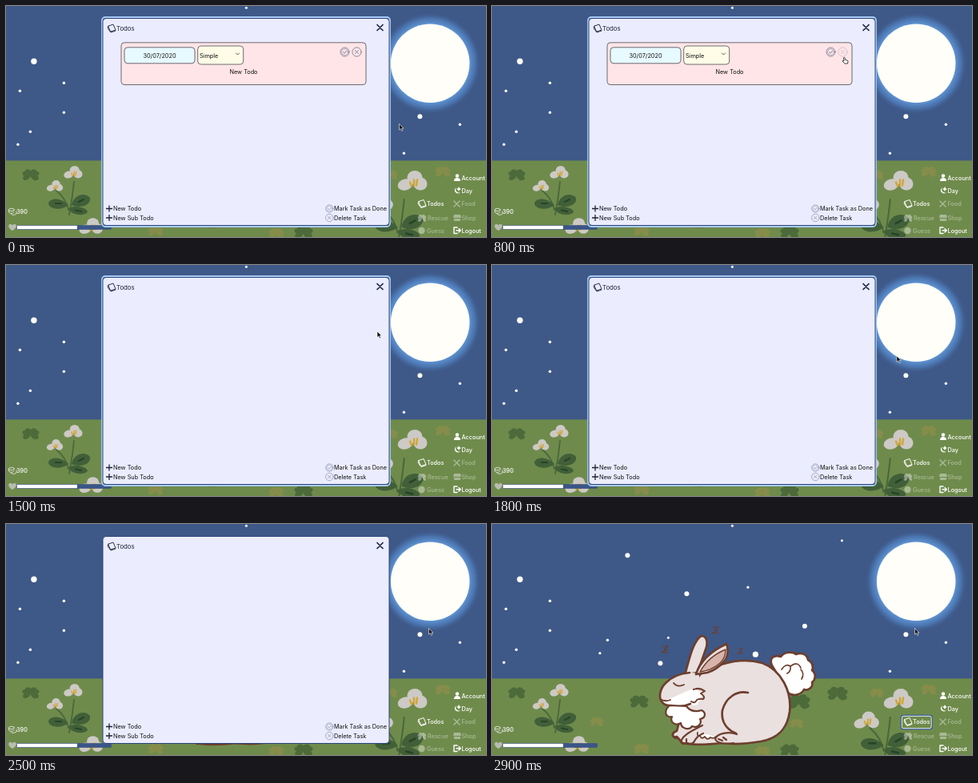
These frames come from a looping animation (600x289 px, 3 s). An HTML page:

```html
<!DOCTYPE html>
<html lang="en">
<head>
<meta charset="utf-8">
<title>Todos</title>
<style>
  html, body { margin: 0; width: 100%; height: 100%; overflow: hidden; background: #3e5888; }
  svg { display: block; width: 600px; height: 289px; font: 7.3px Inter, sans-serif; }
  .line { fill: none; stroke-linecap: round; stroke-linejoin: round; }
  .fur { stroke: #6d3e2e; stroke-width: 2.7; stroke-linecap: round; stroke-linejoin: round; }
</style>
</head>
<body>
<svg viewBox="0 0 600 289">
  <defs>
    <radialGradient id="glow">
      <stop offset=".77" stop-color="#5f93d2"/>
      <stop offset=".88" stop-color="#4f7fbd" stop-opacity=".7"/>
      <stop offset="1" stop-color="#3e5888" stop-opacity="0"/>
    </radialGradient>
    <path id="heart" d="M0 0C-8-3-9-9-5-10Q-2-11 0-8Q2-11 5-10C9-9 8-3 0 0Z"/>
    <g id="clover">
      <use href="#heart"/>
      <use href="#heart" transform="rotate(-95)"/>
      <use href="#heart" transform="rotate(95)"/>
      <path class="line" d="M0 0Q1 5 5 8" stroke="currentColor" stroke-width="1.5"/>
    </g>
    <g id="flower">
      <g fill="#cdc9c6">
        <ellipse cx="-10" cy="4" rx="9.5" ry="7" transform="rotate(-15 -10 4)"/>
        <ellipse cx="9" cy="3" rx="8.5" ry="8"/>
        <ellipse cx="2" cy="-5" rx="9.5" ry="8.5"/>
      </g>
      <path class="line" d="M-4 1L-2 6M1-2V5M5-2L4 5" stroke="#d3a634" stroke-width="2.4"/>
    </g>
    <g id="plant">
      <path class="line" d="M-1 26Q3 5 5-15M-2 20Q-5 6-17-4" stroke="#4a683c" stroke-width="1.8"/>
      <g fill="#416039">
        <path d="M-2 14C-13 3-26 6-27 12C-26 20-10 21-2 14Z"/>
        <path d="M2 14C4 1 19-3 25 5C27 14 13 19 2 14Z"/>
        <path d="M-2 18C8 13 22 18 22 23C16 29 0 26-2 18Z"/>
      </g>
      <path class="line" d="M-18 12H-11M11 10L17 7M7 20.500L14 22" stroke="#274526" stroke-width="2.200"/>
    </g>
    <g id="book" class="line" stroke="currentColor">
      <path d="M-4-3L2-5L5 2L-1 4ZM-4-3Q-6-1-4 1L-1 5L5 3"/>
    </g>
    <g id="check" class="line" stroke="#66708a" stroke-width=".8">
      <circle r="5.5"/><circle r="4" stroke-width=".5"/><path d="M-2 0L-.5 1.7L2.5-1.8"/>
    </g>
    <g id="cross" class="line" stroke="#66708a" stroke-width=".8">
      <circle r="5.6"/><path d="M-2-2L2 2M2-2L-2 2"/>
    </g>
    <path id="plus" d="M-4 0H4M0-4V4" stroke="#1d2436" stroke-width="1.3"/>
    <path id="zed" class="line" d="M-3-4Q0-5 4-4Q1-2-1 0H3Q0 2-4 4Q0 3 4 4" stroke="#6d3e2e" stroke-width="1.2"/>
  </defs>

  <rect width="600" height="289" fill="#3e5888"/>
  <g id="stars" fill="#fffef6" transform="translate(.4 .2)"></g>
  <circle cx="530.2" cy="71.7" r="64" fill="url(#glow)"/>
  <circle cx="530.2" cy="71.7" r="49.3" fill="#fffef8"/>
  <rect y="193.4" width="600" height="96" fill="#6f8b4c"/>
  <g id="clovers"></g>
  <use href="#plant" x="80" y="235"/>
  <use href="#flower" transform="translate(84.5 208.500)scale(.63)"/>
  <use href="#flower" transform="translate(61.500 225.500)scale(.55)"/>
  <use href="#flower" transform="translate(107 276)scale(.8)"/>
  <use href="#plant" transform="translate(492 260)scale(1.15 1.2)"/>
  <use href="#flower" transform="translate(509 219.500)"/>
  <use href="#flower" transform="translate(469 246)scale(.85)"/>

  <g id="rabbit" class="fur" fill="#e9e0df">
    <path fill="#fff" d="M350 177C346 168 352 163 361 166C365 160 376 159 380 163C387 160 394 163 395 170C401 173 402 180 400 183C406 188 404 195 400 198C402 204 395 209 390 207C387 213 378 216 371 212Z"/>
    <path fill="none" stroke-width="1.7" d="M362 182Q367 174 373 178Q374 184 369 187M373 178Q382 171 386 180M386 182Q391 187 387 194"/>
    <path d="M241 189C246 172 250 150 260 141C267 137 271 147 267 157Q262 173 256 186Z"/>
    <path d="M260 188C284 174 310 166 338 174C362 183 375 210 372 235C369 256 358 268 336 272C319 275 302 276 288 274C270 276 252 277 238 274L231 266C224 268 224 261 231 259L240 225Z"/>
    <path d="M258 187C244 184 229 188 220 196C211 203 207 215 212 222Q216 228 224 227C242 231 262 224 266 213Z" stroke="none"/>
    <path fill="#fff" stroke="none" d="M211 221C224 221 242 207 252 207L264 211L257 226Q228 231 211 221Z"/>
    <path fill="none" d="M247 186C234 187 224 192 217 199C210 206 208 216 212 222Q216 228 224 227Q237 230 248 225"/>
    <path fill="#fff" stroke-width="2.200" d="M222 227C214 234 217 243 225 241C222 248 229 253 236 249C237 257 247 258 250 253C257 256 263 250 260 244C267 243 268 236 262 233C252 236 246 232 243 228Z"/>
    <path fill="none" stroke-width="2" d="M252 207Q259 204 266 209L261 212Q267 216 264 219Q259 218 256 220Q254 225 249 222"/>
    <path d="M255 188C260 172 274 159 293 150C296 157 295 167 289 173Q281 182 269 186Z"/>
    <path fill="#d8b3ab" stroke-width="1.400" d="M260 185C266 174 277 163 292 157Q292 168 285 174Q275 183 260 185Z"/>
    <path fill="none" stroke-width="1.900" d="M227 199Q232 205 240 201M210 219Q216 223 223 220"/>
    <path fill="none" d="M320 211C305 208 292 218 288 233C286 247 293 257 305 262"/>
    <path stroke-width="2.200" d="M306 263C296 259 281 262 279 269C281 275 293 275 302 274M283 269L288 271M289 267L293 270"/>
    <path fill="#fff" stroke-width="1.800" d="M257 261Q256 266 260 265Q262 270 266 266Q269 271 273 267Q277 269 280 266"/>
    <path fill="none" stroke-width="2.200" d="M263 252C255 256 245 260 239 267C234 273 237 277 244 274Q251 277 254 270Q257 265 264 262M243 269V274M231 259C224 261 225 269 232 268"/>
  </g>
  <use href="#zed" x="279" y="133"/>
  <use href="#zed" x="216" y="157"/>
  <use href="#zed" transform="translate(310 159)scale(.8)"/>

  <g fill="#fff">
    <g class="line" stroke="#dfe3d8" stroke-width=".9">
      <ellipse cx="7" cy="255" rx="3.5" ry="1.7"/><path d="M3.5 255V258Q7 261 10 258M6 260Q9 263 13 260V257"/>
    </g>
    <text x="13" y="260" font-weight="500">390</text>
    <use href="#heart" transform="translate(8 281)scale(.65 .8)" fill="#b9bdb1"/>
    <rect x="13.5" y="274.5" width="118" height="5" rx="1" fill="#3a5689"/>
    <rect x="13.5" y="274.5" width="75.5" height="5" rx="1"/>
    <rect x="13.5" y="274.5" width="118" height="5" rx="1" fill="none" stroke="#3a5176" stroke-width=".6"/>
  </g>

  <g id="focus" fill="none">
    <rect x="511.500" y="239.500" width="38.500" height="17" rx="2.500" stroke="#2f559a" stroke-width="1.600"/>
    <rect x="512.300" y="240.300" width="36.900" height="15.400" rx="2" stroke="#fff" stroke-width=".9"/>
  </g>
  <g id="menu" font-weight="500"></g>
  <g fill="#fff" color="#fff">
    <circle cx="564" cy="212.5" r="2.2"/><path d="M560 219Q560 215 564 215T568 219Z"/>
    <path d="M563 227A4 4 0 1 0 568 233A4 4 0 0 1 563 227Z"/><path d="M566 226l1 2 2 1-2 1-1 2-1-2-2-1 2-1Z"/>
    <use href="#book" x="520" y="247.5"/>
    <path class="line" d="M564 277H560V284.500H564M563 280.700H568M566 278.500L568.300 280.700L566 283" stroke="#fff" stroke-width="1.4"/>
  </g>
  <g fill="#fff" opacity=".4">
    <path class="line" d="M560 244L567 251M567 244L560 251" stroke="#fff" stroke-width="1.5"/>
    <use href="#clover" transform="translate(520 266)scale(.5)"/>
    <path d="M560 261H568L569 265H559ZM560 266H568V269H560Z"/>
    <circle cx="519.500" cy="281" r="4.200"/>
  </g>

  <g id="modal" fill="#111">
    <rect id="ring" x="120" y="14" width="360" height="262" rx="4" fill="none" stroke="#a9ccf5" stroke-width="1.8"/>
    <rect x="121" y="15.500" width="358" height="259" rx="4" fill="#ebecfe" stroke="#29447a"/>
    <g color="#30384c"><use href="#book" x="132" y="28"/></g>
    <text x="138" y="31" font-size="7.8" fill="#222a3c">Todos</text>
    <path class="line" d="M464 23.500L471 30.500M471 23.500L464 30.500" stroke="#1c2742" stroke-width="1.700"/>
    <use href="#plus" x="129" y="253.500"/>
    <use href="#plus" x="129" y="265"/>
    <text x="134" y="256">New Todo</text>
    <text x="134" y="267.600">New Sub Todo</text>
    <use href="#check" transform="translate(404.300 253.500)scale(.85)" opacity=".75"/>
    <use href="#cross" transform="translate(404.300 265)scale(.85)" opacity=".75"/>
    <text x="410" y="256">Mark Task as Done</text>
    <text x="410" y="267.600">Delete Task</text>
    <g id="card">
      <g stroke="#484951" stroke-width=".8">
        <rect x="144" y="45.800" width="306" height="52.700" rx="4" fill="#ffe5e7"/>
        <rect x="148" y="51.800" width="88" height="20" rx="4" fill="#e7faff"/>
        <rect x="239.700" y="50" width="57" height="23" rx="4" fill="#fffde8"/>
      </g>
      <text x="192" y="64.700" text-anchor="middle">30/07/2020</text>
      <text x="242" y="64.700">Simple</text>
      <path class="line" d="M287.500 59L289.500 61L291.500 59" stroke="#6b4a40"/>
      <text x="297" y="84.500" text-anchor="middle">New Todo</text>
      <use href="#check" x="423.500" y="57.500"/>
      <use id="remove" href="#cross" x="438.500" y="57.500"/>
    </g>
  </g>

  <g id="cursor" stroke-linejoin="round">
    <path id="arrow" d="M0 0V7.500L1.800 6L3.100 8.800L4.500 8.200L3.200 5.500H5.500Z" fill="#111" stroke="#fff" stroke-width=".6"/>
    <path id="hand" d="M-.5.800Q.300-.300 1 .800L1.700 3.500L4.500 4.200Q5.500 5 4.500 8H1L-2 5Q-2 4 0 4.700Z" fill="#fff" stroke="#111" stroke-width=".8"/>
  </g>
</svg>
<script>
const $ = id => document.getElementById(id);
const show = (id, on) => $(id).style.display = on ? '' : 'none';

const stars = [
  [300, 2, 1.5], [437, 20.5, 1.5], [169, 39, 3], [34.5, 69, 3.7], [243, 87, 3], [319.5, 79, 1.6], [17, 106, 1.7],
  [72, 96, 1.7], [72, 133, 1.7], [390.5, 127.5, 3], [144, 145, 1.7], [30, 157, 1.7], [134.5, 161.5, 1.6],
  [14.5, 173, 1.7], [220, 142, 1.5], [210, 174, 3], [329, 163, 3.6], [517, 138, 3], [567, 148, 1.7], [497, 184, 1.7]
];
$('stars').innerHTML = stars.map(([x, y, r]) => `<circle cx="${x}" cy="${y}" r="${r}"/>`).join('');

const dark = '#4c6a3a', olive = '#868d4a';
const clovers = [[31, 212, 1, dark], [184, 223, 1.1, dark], [432, 213, 1.2, dark], [384, 223, 1.3, dark], [372, 284, 1.1, dark],
  [131, 248, .8, olive], [187, 282, .9, olive], [381, 250, .8, olive], [338, 285, .9, olive], [481, 212, .8, olive], [546, 208, .9, olive]];
$('clovers').innerHTML = clovers.map(([x, y, s, color]) =>
  `<use href="#clover" transform="translate(${x} ${y})scale(${s} ${s * .75})" fill="${color}" color="${color}"/>`).join('');

const menu = [['Account', 569.5, 217.7, 1], ['Day', 569.5, 233.7, 1], ['Todos', 526, 250, 1], ['Food', 569.5, 250, .4],
  ['Rescue', 527, 267.7, .4], ['Shop', 569.5, 267.7, .4], ['Guess', 526, 283.5, .4], ['Logout', 569.5, 283.5, 1]];
$('menu').innerHTML = menu.map(([label, x, y, alpha]) =>
  `<text x="${x}" y="${y}" fill="#fff" opacity="${alpha}">${label}</text>`).join('');

// Cursor stops: time, x, y
const path = [[0, 491.5, 147.5], [100, 491.5, 147.5], [600, 440, 64], [1200, 440, 64], [1500, 464, 83], [2000, 528.5, 130.5], [3000, 528.5, 130.5]];

function cursorAt(t) {
  const i = path.findIndex(p => p[0] > t);
  const [t0, x0, y0] = path[i - 1], [t1, x1, y1] = path[i];
  const k = (t - t0) / (t1 - t0);
  const ease = k * k * (3 - 2 * k);
  return [x0 + (x1 - x0) * ease, y0 + (y1 - y0) * ease];
}

function draw() {
  const t = Math.floor(performance.now() % 3000 / 100) * 100;
  const [x, y] = cursorAt(t);
  const hasCard = t < 1200;
  const hover = hasCard && Math.hypot(x - 438.5, y - 57.5) < 8;
  $('cursor').setAttribute('transform', `translate(${x} ${y})`);
  $('remove').setAttribute('opacity', hover ? .35 : 1);
  show('hand', hover);
  show('arrow', !hover);
  show('card', hasCard);
  show('ring', t < 2500);
  show('modal', t < 2600);
  show('focus', t >= 2600);
  requestAnimationFrame(draw);
}
draw();
</script>
</body>
</html>
```
